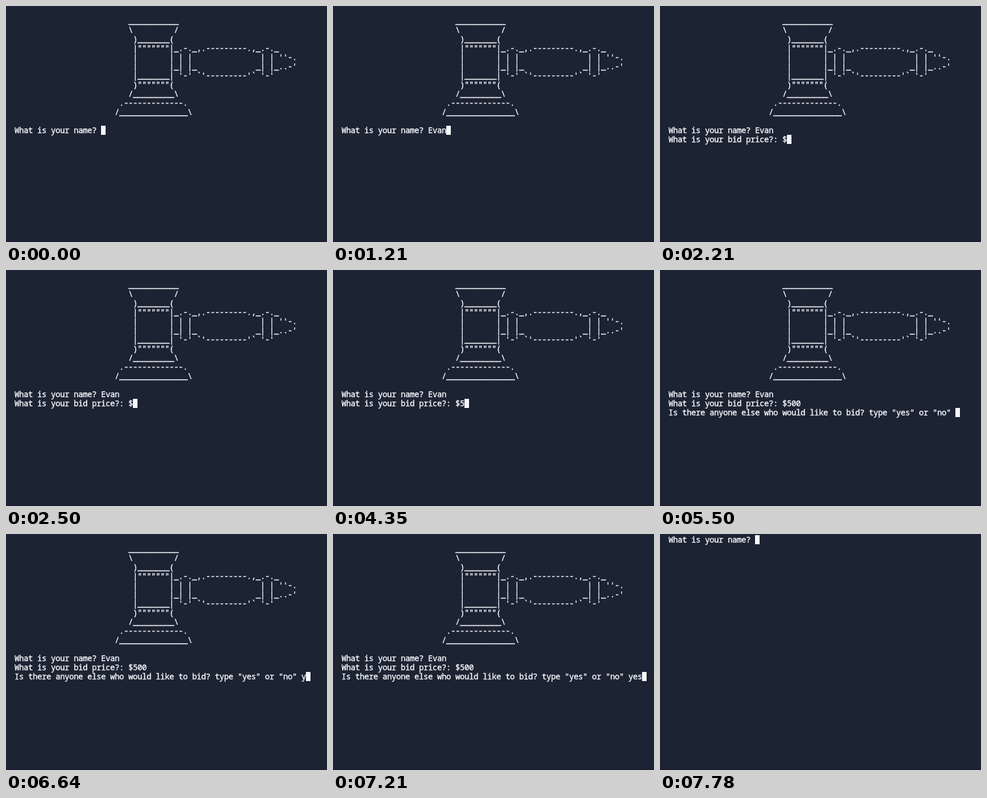
Recreate the animation shown at these times as an HTML page. Size 564 by 414 pixels, loop 8000 ms.

```html
<!DOCTYPE html>
<html lang="en">
<head>
<meta charset="utf-8">
<title>Auction console</title>
<style>
  html, body { margin: 0; width: 564px; height: 414px; overflow: hidden; background: #1c2333; }
  /* 14px type on a terminal grid of whole 8 x 16 pixel cells */
  #screen {
    position: absolute; left: 15px; top: 2px; margin: 0;
    font: 14px/16px "Noto Sans Mono", "DejaVu Sans Mono", monospace;
    letter-spacing: -0.4px;
    font-variant-ligatures: none;
    color: #f5f9fc; -webkit-text-stroke: 0.4px #f5f9fc;
    white-space: pre;
  }
  #cursor { position: absolute; left: 15px; top: 2px; width: 8px; height: 16px; background: #f5f9fc; }
  #edge { position: absolute; left: 0; bottom: 0; width: 100%; height: 2px; background: #191d2d; }
</style>
</head>
<body>
<pre id="screen"></pre>
<div id="cursor"></div>
<div id="edge"></div>
<script>
const CELL_W = 8, CELL_H = 16, LOOP = 8000;

// "~" stands for a backtick.
const gavel = String.raw`
                         ___________
                         \         /
                          )_______(
                          |"""""""|_.-._,.---------.,_.-._
                          |       | | |               | | ''-.
                          |       |_| |_             _| |_..-'
                          |_______| '-' ~'---------'~ '-'
                          )"""""""(
                         /_________\
                       .-------------.
                      /_______________\
`.replace(/~/g, "`");

const askName = "What is your name? ";
const askBid = "What is your bid price?: $";
const askMore = 'Is there anyone else who would like to bid? type "yes" or "no" ';

// Each step: start in ms, text to append, and whether the screen is cleared first.
const steps = [
  [0, gavel + "\n" + askName, true],
  [500, "E"], [780, "v"], [1070, "a"], [1210, "n"],
  [2210, "\n" + askBid],
  [4350, "5"], [4640, "0"], [4780, "0"],
  [5210, "\n" + askMore],
  [6500, "y"], [6780, "e"], [7070, "s"],
  [7780, askName, true]
];

const screenEl = document.getElementById("screen");
const cursorEl = document.getElementById("cursor");
let shown = null;

function textAt(time) {
  let text = "";
  for (const [start, part, clear] of steps) {
    if (start > time) break;
    text = clear ? part : text + part;
  }
  return text;
}

function draw() {
  const text = textAt(performance.now() % LOOP);
  if (text !== shown) {
    const lines = text.split("\n");
    const col = lines[lines.length - 1].length;
    screenEl.textContent = text;
    cursorEl.style.transform =
      `translate(${col * CELL_W}px, ${(lines.length - 1) * CELL_H}px)`;
    shown = text;
  }
  requestAnimationFrame(draw);
}
draw();
</script>
</body>
</html>
```
